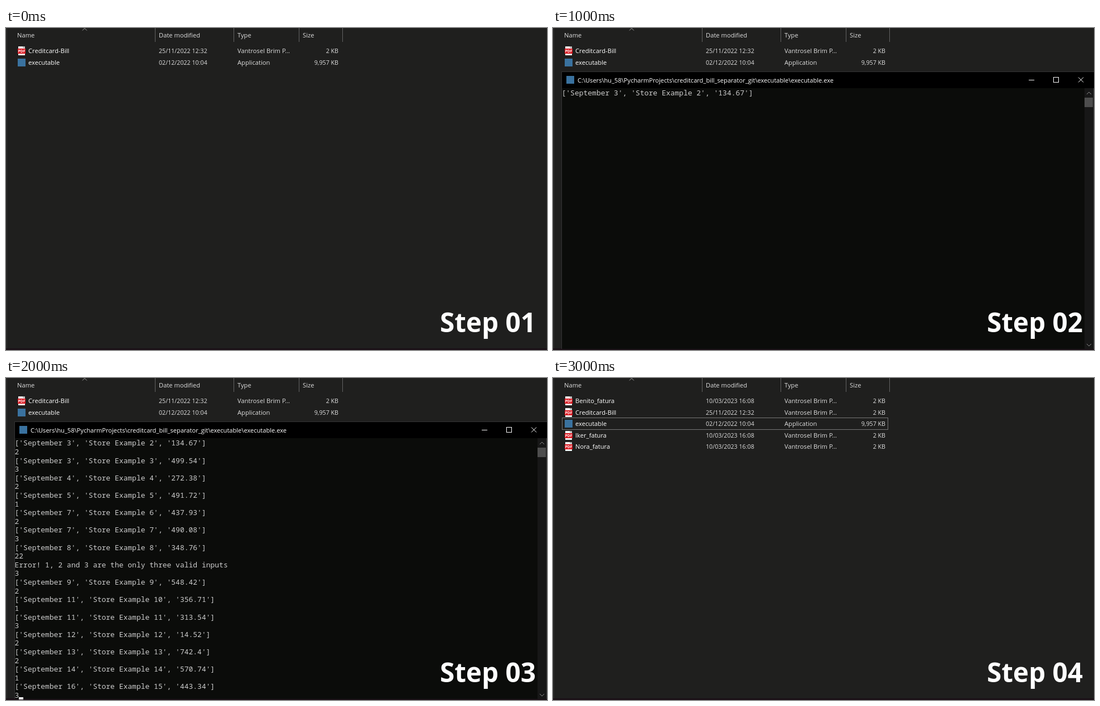
An HTML page with a canvas that plays this animation: 970x578 px, repeating every 4000 ms.

```html
<!DOCTYPE html>
<html lang="en">
<head>
<meta charset="utf-8">
<title>Bill separator steps</title>
<style>
  html, body { margin: 0; width: 100%; height: 100%; overflow: hidden; background: #1f1f1e; }
  canvas { display: block; }
</style>
</head>
<body>
<canvas id="stage" width="970" height="578"></canvas>
<script>
const ctx = document.getElementById('stage').getContext('2d');
const UI = '"Open Sans", sans-serif';
const MONO = '13px "Noto Sans Mono", monospace';
const STEP_MS = 1000;

const VIEWER = 'Vantrosel Brim P...';
const pdf = (name, date) => ({ name, date, type: VIEWER, size: '2 KB', pdf: true });
const bill = pdf('Creditcard-Bill', '25/11/2022 12:32');
const app = { name: 'executable', date: '02/12/2022 10:04', type: 'Application', size: '9,957 KB' };
const before = [bill, app];
const after = [
  pdf('Benito_fatura', '10/03/2023 16:08'),
  bill,
  app,
  pdf('Iker_fatura', '10/03/2023 16:08'),
  pdf('Nora_fatura', '10/03/2023 16:08')
];

// day, amount, then what was typed
const purchases = [
  '3 134.67 2', '3 499.54 3', '4 272.38 2', '5 491.72 1', '7 437.93 2',
  '7 490.08 3', '8 348.76 22', '9 548.42 2', '11 356.71 1', '11 313.54 3',
  '12 14.52 2', '13 742.4 2', '14 570.74 1', '16 443.34 3'
];
const log = purchases.flatMap((row, i) => {
  const [day, amount, key] = row.split(' ');
  const lines = [`['September ${day}', 'Store Example ${i + 2}', '${amount}']`, key];
  if (key > 3) lines.push('Error! 1, 2 and 3 are the only three valid inputs', '3');
  return lines;
});

function rect(x, y, w, h, color) {
  ctx.fillStyle = color;
  ctx.fillRect(x, y, w, h);
}

function text(str, x, y, font, color = '#dedede', align = 'left') {
  ctx.font = font;
  ctx.fillStyle = color;
  ctx.textAlign = align;
  ctx.fillText(str, x, y);
}

function line(points, color) {
  ctx.strokeStyle = color;
  ctx.lineWidth = 1;
  ctx.beginPath();
  points.forEach(([x, y]) => ctx.lineTo(x, y));
  ctx.stroke();
}

const chevron = (x, y, dir, color) =>
  line([[x - 4, y + 2 * dir], [x, y - 2 * dir], [x + 4, y + 2 * dir]], color);

function pdfIcon(x, y) {
  rect(x + 1, y, 12, 16, '#f4f4f4');
  rect(x + 9, y, 4, 3, '#b9b9b9');
  rect(x, y + 4, 14, 9, '#d8141c');
  text('PDF', x + 7, y + 11, 'bold 6.5px ' + UI, '#fff', 'center');
}

const appIcon = (x, y) => rect(x, y, 14, 14, '#3a729f');

function explorer(files, selected) {
  rect(0, 0, 970, 578, '#1f1f1e');
  rect(1, 0, 1, 575, '#2b2b2a');
  rect(0, 575, 970, 3, '#1b1117');

  const head = '11.2px ' + UI;
  [['Name', 20], ['Date modified', 274], ['Type', 415], ['Size', 532]]
    .forEach(([label, x]) => text(label, x, 17, head));
  [267, 408, 525, 603].forEach(x => rect(x, 0, 1, 25, '#636363'));
  chevron(141, 2.5, 1, '#a0a0a0');

  files.forEach((file, i) => {
    const y = Math.round(41 + i * 20.5);
    if (file.pdf) pdfIcon(21, y - 8);
    else appIcon(21, y - 7);
    text(file.name, 40, y + 4, head, '#fff');
    text(file.date, 274, y + 4, '10.7px ' + UI);
    text(file.type, 415, y + 4, head);
    text(file.size, 596, y + 4, '10.7px ' + UI, '#dedede', 'right');
    if (i === selected) {
      ctx.strokeStyle = '#777';
      ctx.lineWidth = 1;
      ctx.strokeRect(16.5, y - 10.5, 584, 21);
    }
  });
}

function terminal(lines, typing) {
  rect(15, 78, 955, 498, '#343434');
  rect(16, 79, 954, 29, '#000');
  rect(16, 108, 937, 468, '#0b0c0a');

  appIcon(24, 86);
  text('C:\\Users\\hu_58\\PycharmProjects\\creditcard_bill_separator_git\\executable\\executable.exe',
    44, 98, '11.1px ' + UI, '#fff');
  rect(853, 93, 10, 1, '#fff');
  ctx.strokeStyle = '#fff';
  ctx.lineWidth = 1;
  ctx.strokeRect(897.5, 88.5, 9, 9);
  line([[942, 88.5], [951, 97.5]], '#fff');
  line([[951, 88.5], [942, 97.5]], '#fff');

  rect(953, 108, 16, 468, '#171717');
  rect(953, 125, 15, 17, '#4d4d4d');
  chevron(961, 117, 1, '#8a8a8a');
  chevron(961, 569, -1, '#8a8a8a');

  ctx.save();
  ctx.beginPath();
  ctx.rect(16, 108, 937, 469);
  ctx.clip();
  lines.forEach((str, i) => text(str, 15.5, 121.3 + i * 15.61, MONO, '#ccc'));
  if (typing) rect(23, 573, 8, 4, '#fff');
  ctx.restore();
}

function draw(now) {
  const step = Math.floor(now / STEP_MS) % 4;
  explorer(step === 3 ? after : before, step === 3 ? 2 : -1);
  if (step === 1) terminal(log.slice(0, 1), false);
  if (step === 2) terminal(log, true);
  text('Step 0' + (step + 1), 778, 546, 'bold 47.6px ' + UI, '#fff');
}

const start = performance.now();
function tick() {
  draw(performance.now() - start);
  requestAnimationFrame(tick);
}
tick();
</script>
</body>
</html>
```
